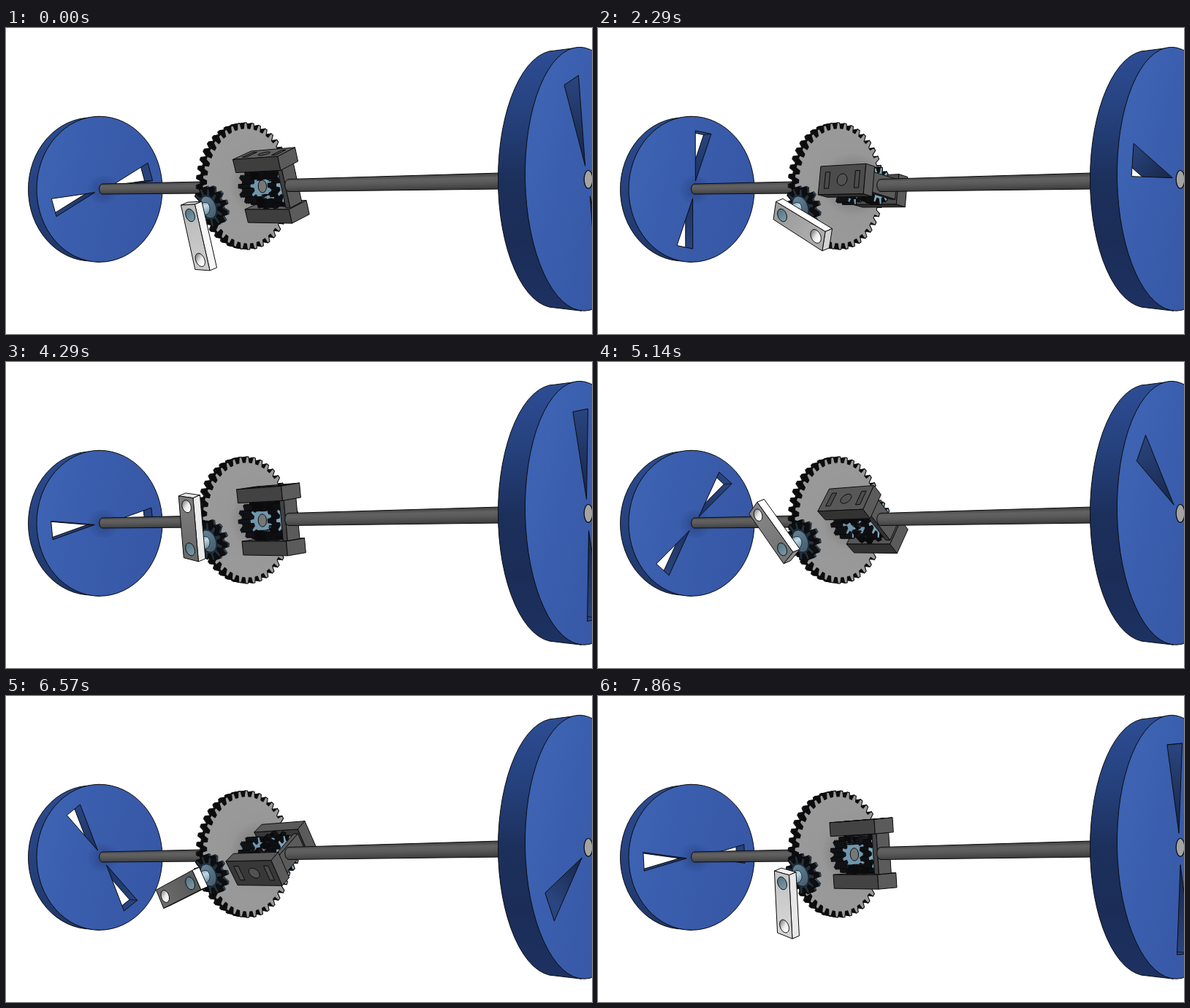
Recreate the animation shown at these times as an HTML page with a canvas. Size 802 by 420 pixels, loop 8000 ms.

```html
<!DOCTYPE html>
<html lang="en">
<head>
<meta charset="utf-8">
<title>Differential drive</title>
<style>
html, body { margin: 0; width: 100%; height: 100%; overflow: hidden; background: #fff; }
canvas { display: block; width: 802px; height: 420px; }
</style>
</head>
<body>
<canvas id="stage" width="802" height="420"></canvas>
<script>
const ctx = document.getElementById('stage').getContext('2d');
const { sin, cos, PI, floor, hypot } = Math;
const LOOP = 8000, STEPS = 56, INK = '#0b0b0d';
const RAD = PI / 180;

// Hand-driven motion: step, shaft angle, crank face tone.
const KEYS = [
  [0, 20, 195], [8, 42, 145], [16, 82, 165], [24, 143, 104],
  [36, 234, 125], [46, 307, 98], [55, 366, 205]
];

const gray = v => { const n = Math.round(v); return `rgb(${n},${n},${n})`; };

function shaftAngle(step) {
  const last = KEYS.length - 2;
  let i = 0;
  while (i < last && step > KEYS[i + 1][0]) i++;
  const slope = k => {
    const a = KEYS[Math.max(0, k - 1)], b = KEYS[Math.min(last + 1, k + 1)];
    return (b[1] - a[1]) / (b[0] - a[0]);
  };
  const [x0, y0] = KEYS[i], [x1, y1] = KEYS[i + 1];
  const w = x1 - x0, u = (step - x0) / w, v = 1 - u;
  return y0 * v * v * (1 + 2 * u) + slope(i) * w * u * v * v +
         y1 * u * u * (3 - 2 * u) - slope(i + 1) * w * u * u * v;
}

function faceTone(step) {
  let i = 0;
  while (i < KEYS.length - 2 && step > KEYS[i + 1][0]) i++;
  const a = KEYS[i], b = KEYS[i + 1];
  return a[2] + (b[2] - a[2]) * (step - a[0]) / (b[0] - a[0]);
}

function paint(fill, stroke = INK, width = 1) {
  if (fill) { ctx.fillStyle = fill; ctx.fill(); }
  if (stroke) { ctx.strokeStyle = stroke; ctx.lineWidth = width; ctx.stroke(); }
}

function trace(pts) {
  ctx.beginPath();
  pts.forEach(p => ctx.lineTo(p[0], p[1]));
  ctx.closePath();
}

function poly(pts, fill, stroke, width) { trace(pts); paint(fill, stroke, width); }

function oval(x, y, rx, ry, tilt, fill, stroke, width) {
  ctx.beginPath();
  ctx.ellipse(x, y, rx, ry, tilt, 0, 2 * PI);
  paint(fill, stroke, width);
}

function blend(x0, y0, x1, y1, ...colors) {
  const g = ctx.createLinearGradient(x0, y0, x1, y1);
  colors.forEach((c, i) => g.addColorStop(i / (colors.length - 1), c));
  return g;
}

function glow(x, y, r, ...colors) {
  const g = ctx.createRadialGradient(x, y, 0, x, y, r);
  colors.forEach((c, i) => g.addColorStop(i / (colors.length - 1), c));
  return g;
}

// Closed outline of points placed by map(angle, radius).
function ring(n, map) {
  return Array.from({ length: n }, (_, i) => map(i * 2 * PI / n, 1));
}

function teeth(n, root, phase, map) {
  const pts = [], pitch = 2 * PI / n;
  for (let i = 0; i < n; i++) {
    const a = phase + i * pitch;
    [[-.32, root], [-.17, 1], [.17, 1], [.32, root]].forEach(([o, r]) => pts.push(map(a + o * pitch, r)));
  }
  return pts;
}

const facing = q => {
  let s = 0;
  q.forEach((p, i) => { const n = q[(i + 1) % q.length]; s += p[0] * n[1] - n[0] * p[1]; });
  return s;
};

function rod(x0, y0, r0, x1, y1, r1) {
  ctx.beginPath();
  ctx.moveTo(x0, y0 - r0);
  ctx.lineTo(x1, y1 - r1);
  ctx.lineTo(x1, y1 + r1);
  ctx.lineTo(x0, y0 + r0);
  ctx.ellipse(x0, y0, r0 * .62, r0, 0, PI / 2, PI * 1.5);
  // The shading runs square to the sloping axis.
  const mx = (x0 + x1) / 2, my = (y0 + y1) / 2, r = (r0 + r1) / 2;
  const lean = -r * (y1 - y0) / (x1 - x0);
  paint(blend(mx - lean, my - r, mx + lean, my + r, '#454545', '#626262', '#5c5c5c', '#4e4e4e', '#3c3c3c'));
}

const leftRod = () => rod(132, 221, 7, 266, 219, 8);
const rightRod = () => rod(387, 216, 8.5, 676, 210, 11);

const LEFT = {
  face: [128, 221.3, 86, 100], back: [117, 221.5, 86.5, 98.5], tilt: 0,
  hub: [131.5, 222], a: [-69, -3], b: [-3, 80], shift: -10, shrink: .985,
  rim: ['#2c4c92', '#26427f', '#1f3668'], wall: ['#1d3265', '#29457f']
};
const RIGHT = {
  face: [788, 207.3, 77.5, 181], back: [751.5, 207.5, 78, 176.5], tilt: -.02,
  hub: [796, 210], a: [0, -144], b: [-65, -9], shift: -40, shrink: .97,
  rim: ['#2d4d94', '#25417d', '#1c305c', '#1b2d57', '#1d3262'], wall: ['#172648', '#2a457f'],
  behind: rightRod
};

function wheel(w, angle) {
  const [fx, fy, frx, fry] = w.face, [bx, by, brx, bry] = w.back;
  ctx.beginPath();
  ctx.moveTo(fx, fy - fry);
  ctx.lineTo(bx, by - bry);
  ctx.ellipse(bx, by, brx, bry, 0, -PI / 2, PI / 2, true);
  ctx.lineTo(fx, fy + fry);
  paint(blend(0, by - bry, 0, by + bry, ...w.rim));
  oval(fx, fy, frx, fry, w.tilt, blend(fx - frx, fy - 20, fx + frx, fy + 20, '#3d63b2', '#395cab', '#3657a5'));
  if (w === LEFT) oval(133, 222, 24, 19, 0, glow(133, 222, 23, 'rgba(20,35,80,.4)', 'rgba(30,50,100,0)'), null);

  const [hx, hy] = w.hub;
  for (const turn of [0, PI]) {
    const c = cos(angle + turn), s = sin(angle + turn);
    const at = (r, t) => [0, 1].map(i => r * (c * w.a[i] + s * w.b[i]) + t * (c * w.b[i] - s * w.a[i]));
    const local = [at(.15, 0), at(1, -.16), at(1, .16)];
    const front = local.map(p => [hx + p[0], hy + p[1]]);
    const rear = local.map(p => [hx + w.shift + p[0] * w.shrink, hy + p[1] * w.shrink]);
    ctx.save();
    trace(front);
    ctx.clip();
    poly(front, blend(front[0][0], front[0][1], front[1][0], front[1][1], ...w.wall), null);
    front.forEach((p, i) => {
      ctx.beginPath();
      ctx.moveTo(...p);
      ctx.lineTo(...rear[i]);
      paint(null, INK, .8);
    });
    ctx.save();
    trace(rear);
    ctx.clip();
    poly(rear, '#fff', null);
    if (w.behind) w.behind();
    ctx.restore();
    poly(rear, null, INK, .9);
    ctx.restore();
    poly(front, null);
  }
}

function bigGear(angle) {
  const map = (cx, k) => (a, r) => [cx - 61 * k * r * sin(a), 217 - 87 * k * r * cos(a) - 2 * r * sin(a)];
  for (let d = 10; d > 0; d -= 1) {
    poly(teeth(40, .91, angle, map(330 - d, 1 - d * .002)), d > 8 ? '#303030' : '#151515', INK, .8);
  }
  poly(teeth(40, .91, angle, map(330, 1)), glow(350, 215, 88, '#5c5c5c', '#828282', '#979797', '#999', '#999'), INK, 1.1);
}

// Crank frame: zero points down, positive turns to the right.
const DOWN = [9, 60], SIDE = [43, 5];
const swing = (a, r) => [0, 1].map(i => r * (cos(a) * DOWN[i] + sin(a) * SIDE[i]));

function pinion(angle) {
  const map = (x, y, k) => (a, r) => { const p = swing(a, r * k); return [x + p[0], y + p[1]]; };
  for (let d = 9; d > 0; d--) {
    poly(teeth(11, .67, angle, map(277 + d, 246 - d * .35, .44)), d > 7 ? '#6f95aa' : '#15191c', INK, .8);
  }
  poly(teeth(11, .67, angle, map(277, 246, .44)), '#22303a', INK, 1.4);
  poly(ring(32, map(277, 246, .25)), blend(262, 230, 290, 262, '#6889a0', '#3f5868'), INK, .7);
  const a = [252, 257], b = [273, 248], r = 8.5;
  ctx.beginPath();
  ctx.moveTo(a[0] - 3, a[1] - r);
  ctx.lineTo(b[0] - 2, b[1] - r);
  ctx.ellipse(b[0], b[1], 6, r, 0, -PI / 2, PI / 2);
  ctx.lineTo(a[0] + 3, a[1] + r);
  paint(blend(264, 241, 272, 259, '#7d9fb2', '#c3d8e2', '#92b2c2', '#5d7c8e'), INK, .7);
}

function crank(angle, tone) {
  const ox = 252, oy = 257, dx = 9.5, dy = -4;
  const along = swing(angle, 1), across = swing(angle + PI / 2, 1);
  // The left side lies farther away and shrinks a little.
  const at = (l, t) => {
    const x = along[0] * l + across[0] * t, y = along[1] * l + across[1] * t;
    const k = 1 / (1 - x * .0014);
    return [ox + x * k, oy + y * k];
  };
  const face = [at(-.24, -.23), at(-.24, .23), at(1.22, .23), at(1.22, -.23)];
  const mid = at(.49, 0);
  face.forEach((p, i) => {
    const n = face[(i + 1) % 4];
    let nx = n[1] - p[1], ny = p[0] - n[0];
    if (nx * ((p[0] + n[0]) / 2 - mid[0]) + ny * ((p[1] + n[1]) / 2 - mid[1]) < 0) { nx = -nx; ny = -ny; }
    if (nx * dx + ny * dy <= 0) return;
    const light = (nx * .75 - ny * .66) / hypot(nx, ny);
    poly([p, n, [n[0] + dx, n[1] + dy], [p[0] + dx, p[1] + dy]], gray(Math.min(255, 115 + 150 * Math.max(0, light))));
  });
  const end = at(1, 0);
  poly(face, blend(ox, oy, end[0], end[1], gray(tone - 8), gray(tone + 8)));
  const hole = l => ring(28, a => at(l + .145 * cos(a), .145 * sin(a)));
  poly(hole(0), blend(ox - 6, oy - 8, ox + 6, oy + 8, '#55717f', '#7d9dac'));
  poly(hole(1), blend(end[0] - 6, end[1] - 4, end[0] + 6, end[1] + 4, '#8e8e8e', '#e9e9e9', '#fff'));
}

// Carrier frame: a runs along the axle, n is radial, t is tangential.
function carrier(angle) {
  const c = cos(angle), s = sin(angle);
  const at = (a, n, t) => {
    const p = n * s + t * c, q = n * c - t * s;
    return [393.5 - 60 * a - p * (.6 + .04 * a), 216 + 2 * a - q * (1 - .06 * a) - p * .05];
  };

  function box(a0, a1, n0, n1, w) {
    const quad = (f, flip, shade) => {
      const q = [[0, 0], [1, 0], [1, 1], [0, 1]].map(([u, v]) => f(u, v));
      if (facing(q) * flip > 0) poly(q, gray(shade));
    };
    const A = u => a0 + (a1 - a0) * u, N = v => n0 + (n1 - n0) * v, T = v => w * (2 * v - 1);
    quad((u, v) => at(A(u), n1, T(v)), -1, 72 + 26 * c);
    quad((u, v) => at(A(u), n0, T(v)), 1, 72 - 26 * c);
    quad((u, v) => at(A(u), N(v), w), 1, 70 - 24 * s);
    quad((u, v) => at(A(u), N(v), -w), -1, 70 + 24 * s);
    const cap = [at(a0, n0, -w), at(a0, n1, -w), at(a0, n1, w), at(a0, n0, w)];
    poly(cap, '#5b5b5b');
  }

  function bar(side) {
    const lo = side > 0 ? 28 : -48, hi = side > 0 ? 48 : -28;
    box(0, 1, lo, hi, 21);
    const n = 48 * side;
    const outer = [at(0, n, -21), at(1, n, -21), at(1, n, 21), at(0, n, 21)];
    if (facing(outer) * side >= 0) return;
    for (const a of [.17, .83]) {
      poly([at(a - .05, n, -12), at(a + .05, n, -12), at(a + .05, n, 12), at(a - .05, n, 12)], '#4b4b4b');
    }
    poly(ring(28, k => at(.5 + .11 * cos(k), n, 8.5 * sin(k))), '#525252');
  }

  // Bevel gear centred on the axle.
  function sun(a0, a1, fill, size) {
    for (let i = 0; i <= 6; i++) {
      const a = a0 + (a1 - a0) * i / 6;
      const p = teeth(11, .7, .1, (k, r) => at(a, size * r * cos(k), size * r * sin(k)));
      poly(p, i === 6 ? fill : '#15191c', INK, 1.2);
    }
  }

  // Bevel gear turning on the radial pin.
  function spider(side) {
    const flip = c * side > 0 ? 1 : -1;
    const layer = (n, size) => (k, r) => at(.5 + .36 * size * r * cos(k), n, 21 * size * r * sin(k));
    for (let i = 0; i <= 6; i++) {
      const n = side * (flip > 0 ? 15 + 2 * i : 27 - 2 * i);
      poly(teeth(10, .7, .2, layer(n, 1)), '#13171a', INK, 1.3);
      if (i === 6) poly(teeth(10, .8, .2, layer(n, .66)), '#6f94a8', INK, .8);
    }
  }

  const near = s >= 0 ? 1 : -1;
  bar(-near);
  sun(.98, .72, '#6f96ac', 26);
  poly(ring(28, k => at(.71, 9 * cos(k), 9 * sin(k))), '#777');
  spider(-near);
  spider(near);
  sun(.32, .14, '#7da6bb', 26);
  box(.04, .14, -28, 28, 14);
  bar(near);
}

function draw(step) {
  const angle = shaftAngle(step) * RAD;
  const arm = angle - 14 * RAD;
  ctx.fillStyle = '#fff';
  ctx.fillRect(0, 0, 802, 420);
  ctx.lineJoin = 'round';
  wheel(LEFT, angle);
  leftRod();
  bigGear(angle);
  pinion(arm);
  crank(arm, faceTone(step));
  carrier(angle);
  rightRod();
  wheel(RIGHT, angle);
  oval(797, 207.8, 5.8, 12.3, 0, '#a3a3a3', INK, 1.2);
}

function tick() {
  let step = floor((performance.now() % LOOP + 5) * STEPS / LOOP) % STEPS;
  if (step === 3) step = 2; // short pause in the drag
  draw(step);
  requestAnimationFrame(tick);
}
tick();
</script>
</body>
</html>
```
